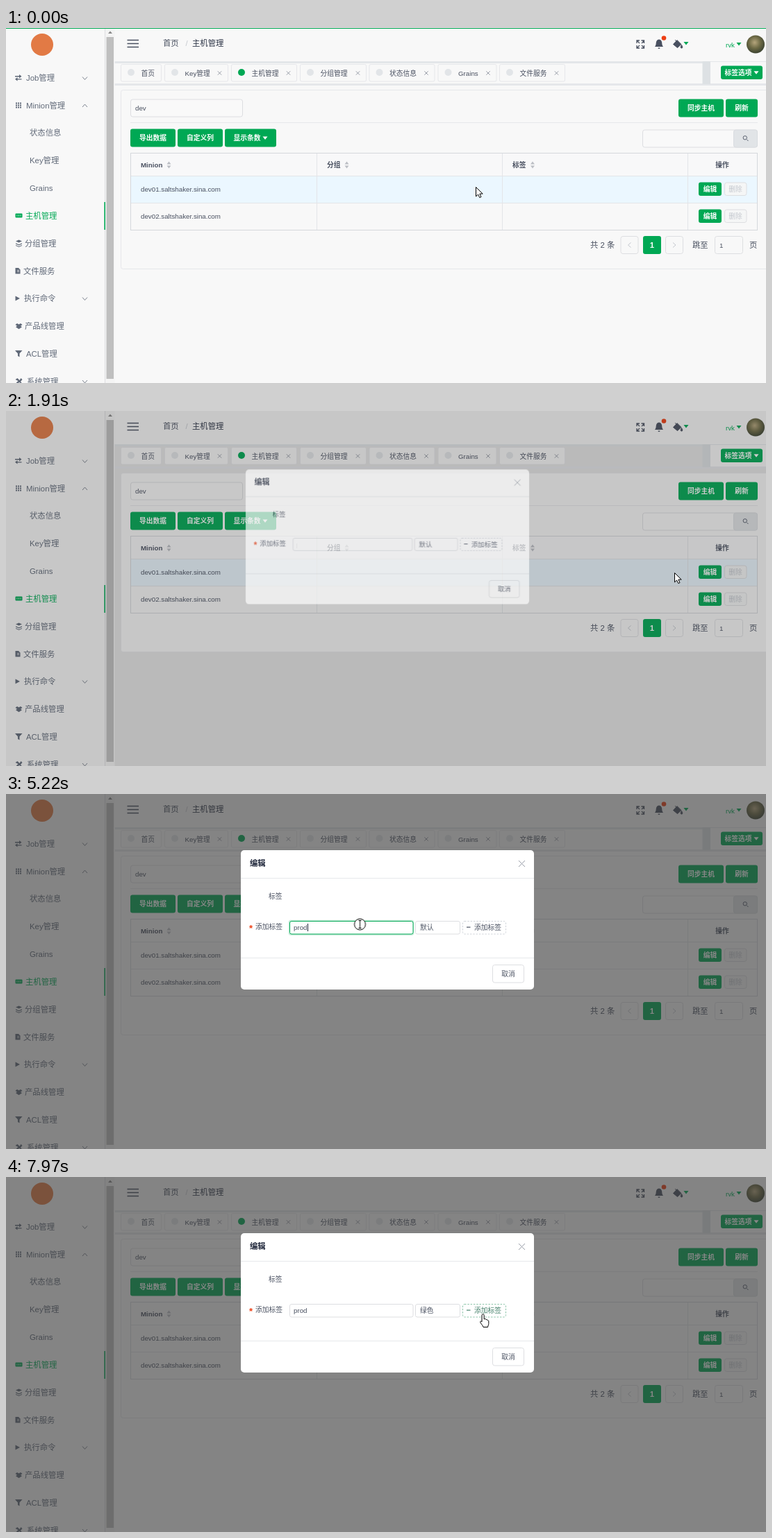
Recreate the animation shown at these times as an HTML page. Size 1094 by 512 pixels, loop 8000 ms.

```html
<!DOCTYPE html>
<html>
<head>
<meta charset="utf-8">
<title>Host management</title>
<style>
html, body { margin: 0; width: 100%; height: 100%; overflow: hidden; background: #f8f8f8; }
svg { display: block; width: 1094px; height: 512px; }
text { font: 9.75px "Liberation Sans", "Noto Sans CJK SC", sans-serif; fill: #495060; white-space: pre; }
.big { font-size: 11.375px; }
.bold { font-weight: bold; }
.side { fill: #606978; }
.mid { text-anchor: middle; }
.white { fill: #fff; }
.green { fill: #00a854; }
.line { fill: none; stroke: #495060; }
.box { fill: #fff; stroke: #dddee1; }

.anim { animation: 8s step-end -4ms infinite; }
#cursor { animation-name: move; }
#arrow { animation-name: arrow; }
#hand { animation-name: hand; }
#beam { animation-name: beam; }
#bar { animation-name: bar; }
#gap { animation-name: gap; }
#hover { animation-name: hover; }
#mask { animation-name: mask; }
#dialog { animation-name: dialog; transform-origin: 549px 181.5px; }
#field { animation-name: field; }
#glow { animation-name: glow; }
#typing { animation-name: typing; }
#caret { animation-name: blink; }
#select { animation-name: select; }
#tick { animation-name: tick; }
#before { animation-name: before; }
#after { animation-name: after; }
#menu { animation-name: menu; transform-origin: 621px 205px; }
#pick { animation-name: pick; }
#add { animation-name: add; }

@keyframes move {
  0% { transform: translate(676px, 229px); }
  1.875% { transform: translate(688px, 229px); }
  3.5625% { transform: translate(735px, 230px); }
  5.25% { transform: translate(815px, 232px); }
  6.9375% { transform: translate(895px, 234px); }
  8.625% { transform: translate(952px, 235px); }
  10.25% { transform: translate(986px, 234px); }
  11.9375% { transform: translate(1004px, 233px); }
  13.625% { transform: translate(1009px, 232px); }
  15.5% { transform: translate(1008px, 232px); }
  17.5% { transform: translate(1008px, 233px); }
  23.875% { transform: translate(962px, 233px); }
  25.75% { transform: translate(725px, 224px); }
  27.5% { transform: translate(612px, 204px); }
  29.375% { transform: translate(546px, 184px); }
  31% { transform: translate(518px, 170px); }
  32.875% { transform: translate(511px, 167px); }
  34.75% { transform: translate(510px, 184px); }
  36.25% { transform: translate(509.5px, 188px); }
  74.375% { transform: translate(520px, 187px); }
  76.125% { transform: translate(548px, 187px); }
  77.75% { transform: translate(576px, 188px); }
  79.625% { transform: translate(602px, 186px); }
  81.25% { transform: translate(617px, 185px); }
  83% { transform: translate(625px, 185px); }
  84.875% { transform: translate(627px, 185px); }
  89.875% { transform: translate(625px, 215px); }
  91.5% { transform: translate(622px, 246px); }
  93.125% { transform: translate(621px, 260px); }
  96.375% { transform: translate(642px, 232px); }
  98% { transform: translate(674px, 204px); }
  99.625% { transform: translate(687px, 198px); }
}
@keyframes arrow { 0%, 23.875%, 96.375% { opacity: 1; } 11.9375%, 34.75%, 98% { opacity: 0; } }
@keyframes hand { 0%, 23.875%, 96.375% { opacity: 0; } 11.9375%, 79.625%, 98% { opacity: 1; } }
@keyframes beam { 0%, 79.625% { opacity: 0; } 34.75% { opacity: 1; } }
@keyframes bar { 0% { opacity: 1; } 23.875%, to { opacity: 0; } }
@keyframes gap { 0%, 29.375% { fill: #f8f8f8; } 23.875% { fill: #e6e6e6; } 25.75% { fill: #ececec; } }
@keyframes hover { 0% { opacity: 1; } 25.75%, to { opacity: 0; } }
@keyframes mask { 0% { opacity: 0; } 23.875% { opacity: .42; } 25.75% { opacity: .96; } 27.5%, to { opacity: 1; } }
@keyframes dialog {
  0% { opacity: 0; transform: scale(.8); }
  23.875% { opacity: .67; transform: scale(.967); }
  25.75%, to { opacity: 1; transform: none; }
}
@keyframes field { 0%, 84.875% { stroke: #dddee1; } 34.75% { stroke: #33b976; } 36.25% { stroke: #00a854; } }
@keyframes glow { 0%, 84.875% { opacity: 0; } 46.375% { opacity: .2; } }
@keyframes typing {
  0% { transform: none; }
  58.75% { transform: translateX(5.5px); }
  62.125% { transform: translateX(8.8px); }
  63.75% { transform: translateX(14.2px); }
  65.25%, to { transform: translateX(20px); }
}
@keyframes blink { 0%, 51.75%, 71%, 83% { opacity: 0; } 44.5%, 58.75%, 77.75% { opacity: 1; } }
@keyframes select { 0%, 98% { stroke: #dddee1; } 79.625% { stroke: #33b976; } 81.25% { stroke: #00a854; } }
@keyframes tick { 0%, 96.375% { opacity: 0; } 79.625% { opacity: 1; } }
@keyframes before { 0% { opacity: 1; } 94.75%, to { opacity: 0; } }
@keyframes after { 0% { opacity: 0; } 94.75%, to { opacity: 1; } }
@keyframes menu {
  0%, 96.375% { opacity: 0; transform: none; }
  86.75% { opacity: .7; transform: scaleY(.94); }
  88.25% { opacity: 1; transform: none; }
  94.75% { opacity: .5; transform: scaleY(.94); }
}
@keyframes pick {
  0% { transform: none; }
  89.875% { transform: translateY(24px); }
  91.5%, to { transform: translateY(48px); }
}
@keyframes add { 0% { stroke: #d0d4da; fill: #495060; } 99.625%, to { stroke: #8cc5a9; fill: #44806a; } }
</style>
</head>
<body>
<svg viewBox="0 0 1094 512">
  <defs>
    <radialGradient id="photo" cx=".45" cy=".4" r=".65">
      <stop offset="0" stop-color="#b5a57c"/>
      <stop offset=".5" stop-color="#6d6a45"/>
      <stop offset="1" stop-color="#343d2e"/>
    </radialGradient>
  </defs>
  <g id="page"></g>
  <rect id="mask" class="anim" width="1094" height="512" fill="rgba(55,55,55,.6)"/>
  <g id="dialog" class="anim"></g>
  <g id="menu" class="anim"></g>
  <g id="cursor" class="anim" stroke="#000" fill="#fff" stroke-linejoin="round">
    <path id="arrow" class="anim" d="M.5 .5v13.4l3.1-2.9 2.2 4.6 2.2-1-2.1-4.5h4.3z"/>
    <path id="hand" class="anim" d="M-2 1.5a1.6 1.6 0 0 1 3.2 0V7l1-.3c1.3-.3 1.8.4 1.9 1 1.2-.4 1.9.2 2 1 1.3-.2 1.7.6 1.7 1.4v3.4c0 2-1.2 2.8-1.2 5H0c-.4-2-2.4-3.8-4.2-6.8-.7-1.4 1-2.4 2.2-.8z"/>
    <g id="beam" class="anim">
      <circle r="8"/>
      <path d="M0-5V5M-2-5.5h4M-2 5.5h4" fill="none"/>
    </g>
  </g>
</svg>
<script>
const GREEN = '#00a854';
const text = (x, y, s, cls = '', attrs = '') =>
  `<text x="${x}" y="${y + (cls.includes('big') ? 4.1 : 3.5)}" class="${cls}" ${attrs}>${s}</text>`;
const rect = (x, y, w, h, attrs = '', r = 0) =>
  `<rect x="${x}" y="${y}" width="${w}" height="${h}" rx="${r}" ${attrs}/>`;
const path = (d, attrs = 'class="line"') => `<path d="${d}" ${attrs}/>`;
const dot = (x, y, r, fill) => `<circle cx="${x}" cy="${y}" r="${r}" fill="${fill}"/>`;
const fill = c => `fill="${c}"`;
const cross = (x, y, r) =>
  path(`M${x - r} ${y - r}l${2 * r} ${2 * r}m0 ${-2 * r}l${-2 * r} ${2 * r}`, 'fill="none" stroke="#999ea8"');
const down = (x, y, c) => path(`M${x - 3.5} ${y - 2}h7l-3.5 4.5z`, fill(c));
const chevron = (x, y, dir) =>
  path(`M${x - 3.5} ${y - 2 * dir}l3.5 ${4 * dir} 3.5 ${-4 * dir}`, 'fill="none" stroke="#7b828e"');
const button = (x, y, w, h, s, caretX) =>
  rect(x, y, w, h, fill(GREEN), 3) +
  text(x + w / 2 - (caretX ? 5 : 0), y + h / 2, s, 'mid white bold') +
  (caretX ? down(caretX, y + h / 2, '#fff') : '');
const sorter = (x, y) => path(`M${x - 3} ${y - 1}h6l-3-4zm0 2h6l-3 4z`, fill('#bbbec4'));

function sidebar() {
  const rows = [
    [29, 72, 'Job管理', 1], [29, 111.5, 'Minion管理', -1], [34, 151, '状态信息'], [34, 191, 'Key管理'],
    [34, 231, 'Grains'], [28, 271, '主机管理'], [27, 310.5, '分组管理'], [25, 350.5, '文件服务'],
    [26, 390, '执行命令', 1], [27, 430, '产品线管理'], [29, 469.5, 'ACL管理'], [30, 509.5, '系统管理', 1]
  ];
  const icons = [
    'M13 69h6v-2l3.5 2.8-3.5 2.6v-2h-6zm9.5 5.5h-6v2L13 73.7l3.5-2.5v2h6z',
    'M14 307.5l4.5-2 4.5 2-4.5 2zm0 2.7l4.5 2 4.5-2v1.2l-4.5 2-4.5-2zm0 2.7l4.5 2 4.5-2v1.2l-4.5 2-4.5-2z',
    'M13.5 346h4.5l2.5 2.5v6h-7z',
    'M13.5 386.5l6.5 3.5-6.5 3.5z',
    'M13.5 428l2.5-2 2.5 1.5 2.5-1.5 2.5 2-2.5 1.7 2 1.6-4.5 3-4.5-3 2-1.6z',
    'M13 465h10.5l-4 4.5v5l-2.5-1.5v-3.5z',
    'M13.5 507l3-2 3 3 2-3 2 2-2.5 3 2.5 3h-2l-2-2-4 2-1-1 3-3z'
  ];
  let out = rect(0, 0, 142, 512, fill('#f8f8f8')) + dot(52, 24, 16, '#e27a45');
  for (const [x, y, s, dir] of rows) {
    out += text(x, y, s, y === 271 ? 'big green' : 'big side');
    if (dir) out += chevron(113.5, y + .5, dir);
  }
  out += path(icons.join(''), 'class="side"');
  for (let i = 0; i < 9; i++)
    out += rect(14 + i % 3 * 3, 107.5 + Math.floor(i / 3) * 3, 2, 2, 'class="side"');
  return out + rect(13.5, 267.5, 10, 6, fill(GREEN), 1) +
    path('M16 269.5v2m2.5-2v2m2.5-2v2', 'stroke="#c8ecd9"') +
    path('M16 349.5h3m-3 2h3', 'stroke="#f8f8f8" stroke-width=".8"') +
    rect(142, 0, 1, 512, fill('#dddee1')) + rect(141.4, 251, 1.6, 40, fill(GREEN)) +
    rect(143, 0, 13.5, 512, fill('#f4f4f4')) + rect(144.5, 13, 10.5, 493, fill('#bfbfbf')) +
    path('M147 8h6l-3-3.5z', fill('#888'));
}

function header() {
  return rect(156.5, 0, 938, 48, fill('#f8f8f8')) + rect(156.5, 48, 938, 3, fill('#e3e6e9')) +
    path('M174.5 17.5h16.5m-16.5 5h16.5m-16.5 5h16.5', 'class="line" stroke-width="1.6"') +
    text(226, 22, '首页', 'big') + text(258.5, 22, '/', 'big', 'style="fill:#c5c8ce"') +
    text(268, 22, '主机管理', 'big', 'style="fill:#2b3345"') +
    path('M908 22v-4h4m2.5 0h4v4m0 3v4h-4m-2.5 0h-4v-4m.5-6.5l3.5 3.5m6.5-3.5l-3.5 3.5m-3 3l-3.5 3.5m10 0l-3.5-3.5', 'class="line" stroke-width="1.3"') +
    path('M934 27c2-2 1.5-5 2-7 .6-2.5 2.5-3.5 4-3.5s3.4 1 4 3.5c.5 2 0 5 2 7zm4.5 1.5h3a1.5 1.5 0 0 1-3 0z', fill('#495060')) +
    dot(947, 14.5, 3.3, '#ed3f14') +
    path('M960.5 23.5l5.5-6 6 6-5.5 5zM963 17l4 4M972.5 24.5c2 3 1.5 4.5 0 4.5s-2-1.5 0-4.5z', 'fill="#495060" stroke="#495060"') +
    down(979, 22, GREEN) + text(1036, 24, 'rvk', 'green') + down(1055, 23, GREEN) +
    dot(1079, 23.5, 13, 'url(#photo)');
}

function tabs() {
  const list = [
    [165, 59, '首页'], [228, 92, 'Key管理'], [324, 95, '主机管理'], [423, 96, '分组管理'],
    [522.5, 95, '状态信息'], [621.5, 85, 'Grains'], [710, 95, '文件服务']
  ];
  let out = rect(156.5, 80, 938, 3, fill('#e5e7ea'));
  list.forEach(([x, w, s], i) => {
    out += rect(x + .5, 52.5, w - 1, 24.5, 'fill="#f8f8f8" stroke="#e6e7ea"', 2) +
      dot(x + 15, 64, 5, i === 2 ? GREEN : '#e2e5e8') + text(x + 29.5, 65, s);
    if (i) out += cross(x + w - 12.5, 65, 2.7);
  });
  return out + rect(1002.5, 48, 11.5, 33, fill('#dde1e4')) + rect(1014, 49, 80, 31, fill('#f8f8f8')) +
    button(1029, 54.5, 60, 19.5, '标签选项', 1080);
}

function table() {
  let out = rect(179.5, 181, 902, 32, fill('#f8f8f9')) +
    rect(179.5, 213, 902, 39, 'id="hover" class="anim" fill="#ebf7ff"') +
    path('M179 213.5h903M179 252.5h903M447.5 181v111M714.5 181v111M981.5 181v111', 'stroke="#e3e5e8"') +
    rect(179.5, 180.5, 902, 111, 'fill="none" stroke="#d5d8dc"') +
    text(194, 197, 'Minion', 'bold') + sorter(234.5, 197.5) +
    text(462, 197, '分组', 'bold') + sorter(490.5, 197.5) +
    text(729, 197, '标签', 'bold') + sorter(758, 197.5) + text(1031, 197, '操作', 'mid bold');
  ['dev01', 'dev02'].forEach((host, i) => {
    const y = 232.5 + i * 39;
    out += text(194, y, host + '.saltshaker.sina.com') + button(997, y - 10, 33, 19.5, '编辑') +
      rect(1034.5, y - 9.5, 31.5, 18.5, 'fill="#f5f6f6" stroke="#dddee1"', 3) +
      text(1050, y, '删除', 'mid', 'style="fill:#c3c7ce"');
  });
  return out;
}

function pager() {
  const arrow = (x, d) => rect(x + .5, 300.5, 25, 25, 'fill="none" stroke="#dddee1"', 3) +
    path(`M${x + 13 - d * 2} 309.5l${d * 4} 3.5 ${-d * 4} 3.5`, 'fill="none" stroke="#c3c7ce"');
  return text(841, 313, '共 2 条', 'big') + arrow(884.5, -1) + arrow(949, 1) +
    rect(917, 300, 26, 26, fill(GREEN), 3) + text(930, 313, '1', 'big mid white bold') +
    text(988, 312.5, '跳至', 'big') + rect(1020.5, 300.5, 40, 25, 'fill="none" stroke="#dddee1"', 3) +
    text(1027, 313, '1') + text(1070, 312.5, '页', 'big');
}

function panel() {
  return rect(165.5, 89.5, 940, 258, 'fill="#f8f8f8" stroke="#e6e7ea"', 3) +
    rect(179.5, 103, 161, 25, 'fill="#f9f9f9" stroke="#dddee1"', 3) + text(186, 115.5, 'dev') +
    button(968, 102.5, 65, 26, '同步主机') + button(1036, 102.5, 46, 26, '刷新') +
    rect(179, 136, 903, 1, fill('#e6e7ea')) +
    button(179, 145.5, 65, 26, '导出数据') + button(247, 145.5, 65, 26, '自定义列') +
    button(315, 145.5, 74, 26, '显示条数', 373) +
    rect(916.5, 147, 165, 25, 'fill="#f9f9f9" stroke="#dddee1"', 3) +
    rect(1047.5, 147, 34, 25, 'fill="#e1e4e7" stroke="#d9dce0"', 3) +
    path('M1066.3 160.8l2.2 2.2M1066.5 158.3a2.7 2.7 0 1 1-5.4 0a2.7 2.7 0 1 1 5.4 0', 'class="line" stroke-width=".9"') +
    table() + pager();
}

function dialog() {
  return rect(338, 81, 422, 201, fill('#fff'), 5) +
    text(351, 100, '编辑', 'big bold', 'style="fill:#1c2438"') + cross(742.5, 100.5, 4.5) +
    path('M338 121.5h422M338 236.5h422', 'stroke="#e6e8eb"') +
    text(378, 147.5, '标签') + text(350, 194.5, '*', 'bold', 'style="fill:#ed3f14;font-size:13px"') +
    text(359, 191.5, '添加标签') +
    rect(407.5, 182.5, 179, 20.5, `id="glow" class="anim" fill="none" stroke="${GREEN}" stroke-width="2"`, 3) +
    rect(408.5, 183.5, 177.5, 18.5, 'id="field" class="box anim"', 2.5) + text(414, 192.5, 'prod') +
    `<g id="typing" class="anim">${rect(414, 186, 24, 13, fill('#fff'))}${rect(414, 187, 1, 11, 'id="caret" class="anim" fill="#1c2438"')}</g>` +
    rect(589.5, 183.5, 64, 18.5, 'id="select" class="box anim"', 2.5) +
    text(596, 192.5, '默认', 'anim', 'id="before"') + text(596, 192.5, '绿色', 'anim', 'id="after"') +
    path('M639.5 190h8l-4 4.5z', 'id="tick" class="anim" fill="#8f959f"') +
    `<g id="add" class="anim">${rect(657.5, 183.5, 62, 18.5, 'style="fill:#fff" stroke-dasharray="2.5 1.8"', 2.5)}` +
    rect(663, 191.5, 5.5, 1.2, 'stroke="none"') +
    text(674, 192.5, '添加标签', '', 'style="fill:inherit;stroke:none"') + '</g>' +
    rect(700.5, 246.5, 45, 25.5, 'class="box"', 3) + text(723, 259, '取消', 'mid');
}

function menu() {
  const names = ['默认', '蓝色', '绿色', '红色'];
  return rect(588, 206, 67, 102, 'fill="#000" opacity=".1"', 4) + rect(589, 205, 65, 102, fill('#fff'), 3) +
    rect(589, 208, 65, 24, 'id="pick" class="anim" fill="#f3f3f3"') +
    names.map((s, i) => text(602, 220 + i * 24, s, i ? '' : 'green')).join('');
}

const put = (id, html) => { document.getElementById(id).innerHTML = html; };
put('page', rect(156, 48, 938, 464, 'id="gap" class="anim" fill="#f8f8f8"') +
  header() + tabs() + panel() + sidebar() +
  rect(0, 0, 1094, 1, `id="bar" class="anim" fill="${GREEN}"`));
put('dialog', dialog());
put('menu', menu());
</script>
</body>
</html>
```
